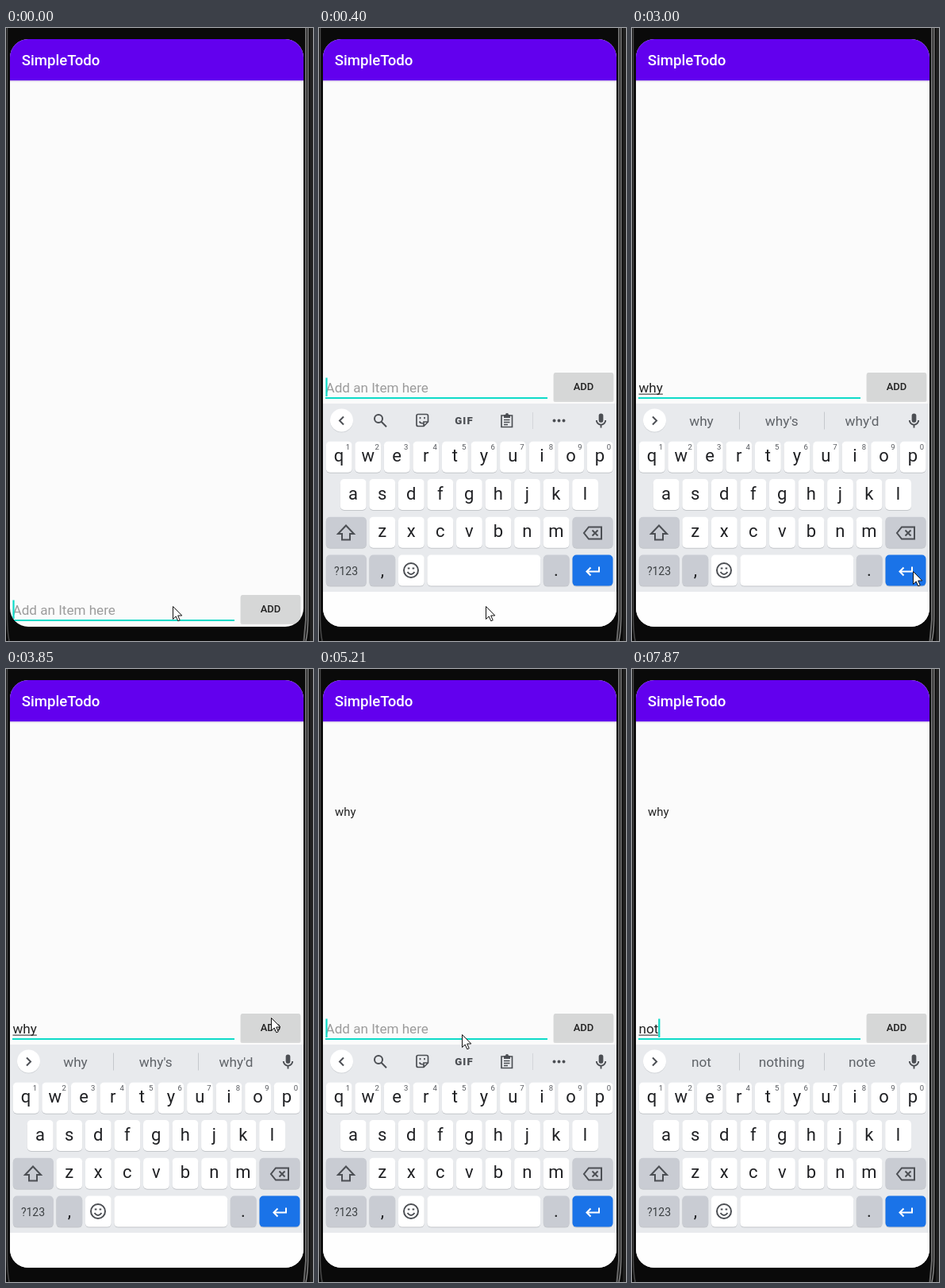
An HTML page that plays this animation: 387 px wide and 772 px high, repeating every 8000 ms.

```html
<!DOCTYPE html>
<html lang="en">
<head>
<meta charset="utf-8">
<title>Todo app</title>
<style>
  html, body { margin: 0; width: 100%; height: 100%; overflow: hidden; background: #0a0a0a; }
  svg { display: block; width: 387px; height: 772px; font-family: Roboto, sans-serif; }
  text { white-space: pre; }
  .mid { text-anchor: middle; }
  .entry { font-size: 17.1px; }
  .key { font-size: 22px; fill: #202124; }
  .word { font-size: 17.2px; fill: #5f6368; }
  .line { fill: none; stroke: #4c4f54; stroke-width: 2; }
  .thin { stroke-width: 1.7; }
  .solid { fill: #4c4f54; }
</style>
</head>
<body>
<svg viewBox="0 0 387 772">
  <defs>
    <clipPath id="screen"><rect x="5" y="14" width="370" height="740" rx="23"/></clipPath>
  </defs>

  <rect width="387" height="772" fill="#0a0a0a"/>
  <path d="M1.5 0V738Q1.5 760 4 772" fill="none" stroke="#4a4a4a" stroke-width="1.5"/>
  <path d="M378 0V745L375.500 772" fill="none" stroke="#6a6a6a" stroke-width="2"/>
  <path d="M380.700 0V740Q380.700 760 378 772" fill="none" stroke="#858585" stroke-width="1.5"/>
  <rect x="383" width="4" height="772" fill="#202020"/>

  <g clip-path="url(#screen)">
    <rect x="5" y="14" width="370" height="740" fill="#fbfbfb"/>
    <rect x="5" y="66" width="370" height="1.5" fill="#d9cdea"/>
    <rect x="5" y="14" width="370" height="52" fill="#6200ee"/>
    <text x="19.7" y="47.3" font-size="18.65" font-weight="500" fill="#fff">SimpleTodo</text>
    <text id="item" x="20" y="185.3" font-size="14.9" fill="#222">why</text>

    <g id="form">
      <text id="hint" class="entry" x="8.5" y="459" fill="#9c9c9c">Add an Item here</text>
      <text id="entry" class="entry" x="8.5" y="459" fill="#222"></text>
      <rect id="underline" x="8.5" y="460.6" height="1" fill="#222"/>
      <rect x="8" y="465" width="280" height="2" fill="#0edbc8"/>
      <rect id="caret" y="440.5" width="2.2" height="23.5" fill="#0edbc8"/>
      <rect x="295.5" y="435" width="76" height="36" rx="2" fill="#000" opacity=".13"/>
      <rect id="button" x="296" y="434" width="75" height="35.5" rx="2"/>
      <text class="mid" x="333.5" y="456.3" font-size="13" font-weight="500" fill="#222">ADD</text>
    </g>

    <g id="keyboard">
      <rect x="5" y="473" width="370" height="237" fill="#e8eaed"/>
      <circle cx="28.5" cy="495" r="14.5" fill="#cfd2d6"/>
      <circle cx="28.5" cy="494" r="14.5" fill="#fff"/>
      <path id="chevron" class="line"/>
      <path class="solid" transform="translate(344.1 483.5) scale(.95)"
        d="M12 14a3 3 0 0 0 3-3V5a3 3 0 0 0-6 0v6a3 3 0 0 0 3 3zm5-3a5 5 0 0 1-10 0H5a7 7 0 0 0 6 6.9V21h2v-3.1A7 7 0 0 0 19 11z"/>

      <g id="tools">
        <path class="line" d="M80 492a5 5 0 1 0-10 0a5 5 0 1 0 10 0M78.800 496l6.200 6.200"/>
        <path class="line thin" d="M132 501.500H125Q123 501.500 123 499.500V488.500Q123 486.500 125 486.500H135.500Q137.500 486.500 137.500 488.500V496ZM132 501.500V496H137.500M126.500 495.500Q128 498.500 131 497.500"/>
        <path class="line thin" d="M127.500 490v2.200M133 490v2.200"/>
        <text class="mid solid" x="183" y="498.6" font-size="13.2" font-weight="900" letter-spacing="1.1">GIF</text>
        <path class="line thin" d="M230 488H243.500V502.500H230ZM233 493.500h7.500M233 496.500h7.500M233 499.500h5"/>
        <path class="solid" d="M233 487h2a2 2 0 0 1 4 0h2v4h-8z"/>
        <rect x="269" y="484" width="1" height="21" fill="#d3d6da"/>
        <path class="line" style="stroke-width:4" stroke-linecap="round" d="M296.500 494.500h.01M302.500 494.500h.01M308.500 494.500h.01"/>
      </g>
      <g id="words">
        <path d="M135.500 483.500v22M242.500 483.500v22" stroke="#c5c8cc"/>
        <text class="mid word" x="87.5" y="500.8"></text>
        <text class="mid word" x="188.7" y="500.8"></text>
        <text class="mid word" x="290" y="500.8"></text>
      </g>

      <g id="keys"></g>
      <path class="line" d="M34 626.500L44 637H39V644.500H29V637H24Z"/>
      <path class="line" d="M340 628.500H356V643.500H340L334 636ZM344.500 632.500l7 7m0-7l-7 7"/>
      <circle class="line" cx="116" cy="683" r="9"/>
      <path class="line" d="M111.500 685Q116 691 120.500 685M111.800 680.500h2.600M117.600 680.500h2.600"/>
      <path class="line" style="stroke:#fff" d="M353 678.500V684.500H338M342.500 679.500l-5 5 5 5"/>
    </g>
    <rect id="navbar" x="5" y="710" width="370" height="44" fill="#fefefe"/>
  </g>

  <path id="mouse" d="M.5.5V16.500L4.200 13 6.800 18.800 9.200 17.800 6.700 12H11.800Z" fill="#fff" stroke="#111"/>
</svg>

<script>
const LOOP = 8000;
const $ = id => document.getElementById(id);

function add(tag, attrs, content = '') {
  const node = document.createElementNS('http://www.w3.org/2000/svg', tag);
  for (const name in attrs) node.setAttribute(name, attrs[name]);
  node.textContent = content;
  $('keys').append(node);
}

function key(x, y, width, fill = '#fff') {
  add('rect', { x, y: y + 1, width, height: 39, rx: 5, fill: '#c3c6ca' });
  add('rect', { x, y, width, height: 39, rx: 5, fill });
}

function letters(row, left, y) {
  [...row].forEach((letter, i) => {
    const x = left + i * 36.55;
    key(x, y, 32.8);
    add('text', { class: 'mid key', x: x + 16.3, y: y + 25.5 }, letter);
  });
}

const GREY = '#c9ccd3';
letters('qwertyuiop', 8.8, 520.7);
letters('asdfghjkl', 26.8, 568);
letters('zxcvbnm', 63.4, 615.7);
[...'1234567890'].forEach((digit, i) =>
  add('text', { class: 'mid', x: 36.5 + i * 36.55, y: 531, 'font-size': 9.5, fill: '#55585d' }, digit));
key(8.8, 615.7, 51, GREY);
key(319.5, 615.7, 51, GREY);
key(8.8, 663.6, 51, GREY);
key(63.4, 663.6, 32.8, GREY);
key(99.9, 663.6, 32.8);
key(136.4, 663.6, 142.8);
key(282.8, 663.6, 32.8, GREY);
key(319.5, 663.6, 51, '#1a73e8');
add('text', { class: 'mid', x: 34, y: 688.5, 'font-size': 14, fill: '#3c4043' }, '?123');
add('text', { class: 'mid key', x: 80, y: 690 }, ',');
add('text', { class: 'mid key', x: 299, y: 690 }, '.');

// Each step changes part of the state and holds until the next one.
const steps = [
  [0, { open: false, drop: 0, text: '', marked: 0, words: '', caret: true, listed: false, pressed: false, mouse: [210, 728] }],
  [280, { open: true, drop: 70 }],
  [400, { drop: 0 }],
  [920, { caret: false }],
  [1170, { text: 'w', caret: true }],
  [1290, { marked: 1, words: 'w we what' }],
  [1690, { text: 'wh' }],
  [1940, { marked: 2, words: 'wh what who' }],
  [2190, { text: 'why' }],
  [2470, { marked: 3, words: "why why's why'd", mouse: [219, 725] }],
  [2620, { mouse: [290, 714] }],
  [2740, { mouse: [354, 704] }],
  [2880, { caret: false, mouse: [354, 684] }],
  [3370, { caret: true, mouse: [352, 660] }],
  [3490, { mouse: [348, 600] }],
  [3610, { mouse: [342, 530] }],
  [3730, { mouse: [337, 470] }],
  [3850, { caret: false, mouse: [334, 439] }],
  [4130, { pressed: true }],
  [4280, { pressed: false, listed: true, text: '', marked: 0, caret: true }],
  [4550, { words: '' }],
  [4670, { caret: false }],
  [4950, { mouse: [316, 444] }],
  [5090, { caret: true, mouse: [240, 454] }],
  [5210, { mouse: [180, 460] }],
  [5580, { caret: false }],
  [6080, { caret: true }],
  [6330, { text: 'n' }],
  [6610, { marked: 1, words: 'n no not' }],
  [6730, { text: 'no' }],
  [6980, { marked: 2, words: 'no not now' }],
  [7350, { text: 'not' }],
  [7630, { marked: 3, words: 'not nothing note', mouse: [270, 474] }],
  [7750, { mouse: [371, 486] }],
  [7870, { mouse: null }],
];

const show = (id, visible) => $(id).setAttribute('visibility', visible ? 'visible' : 'hidden');
const move = (id, x, y) => $(id).setAttribute('transform', `translate(${x} ${y})`);

function draw(time) {
  const state = {};
  for (const [start, change] of steps) if (start <= time) Object.assign(state, change);
  const { open, text, marked, words, mouse } = state;

  move('form', 0, open ? 0 : 280);
  move('keyboard', 0, state.drop);
  $('keyboard').style.display = open ? '' : 'none';
  show('navbar', open);
  show('item', state.listed);
  show('hint', !text);
  show('caret', state.caret);
  $('button').setAttribute('fill', state.pressed ? '#c2c3c3' : '#d6d7d7');

  const entry = $('entry');
  entry.textContent = text;
  $('caret').setAttribute('x', 8.4 + (text && entry.getComputedTextLength()));
  $('underline').setAttribute('width', marked && entry.getSubStringLength(0, marked));

  $('tools').style.display = words ? 'none' : '';
  $('words').style.display = words ? '' : 'none';
  $('chevron').setAttribute('d', words ? 'M26 489.500l5 5-5 5' : 'M31 489.500l-5 5 5 5');
  const list = words.split(' ');
  document.querySelectorAll('.word').forEach((node, i) => node.textContent = list[i] || '');

  show('mouse', mouse);
  if (mouse) move('mouse', ...mouse);
}

const begin = performance.now();
function tick() {
  draw((performance.now() - begin) % LOOP);
  requestAnimationFrame(tick);
}
tick();
</script>
</body>
</html>
```
